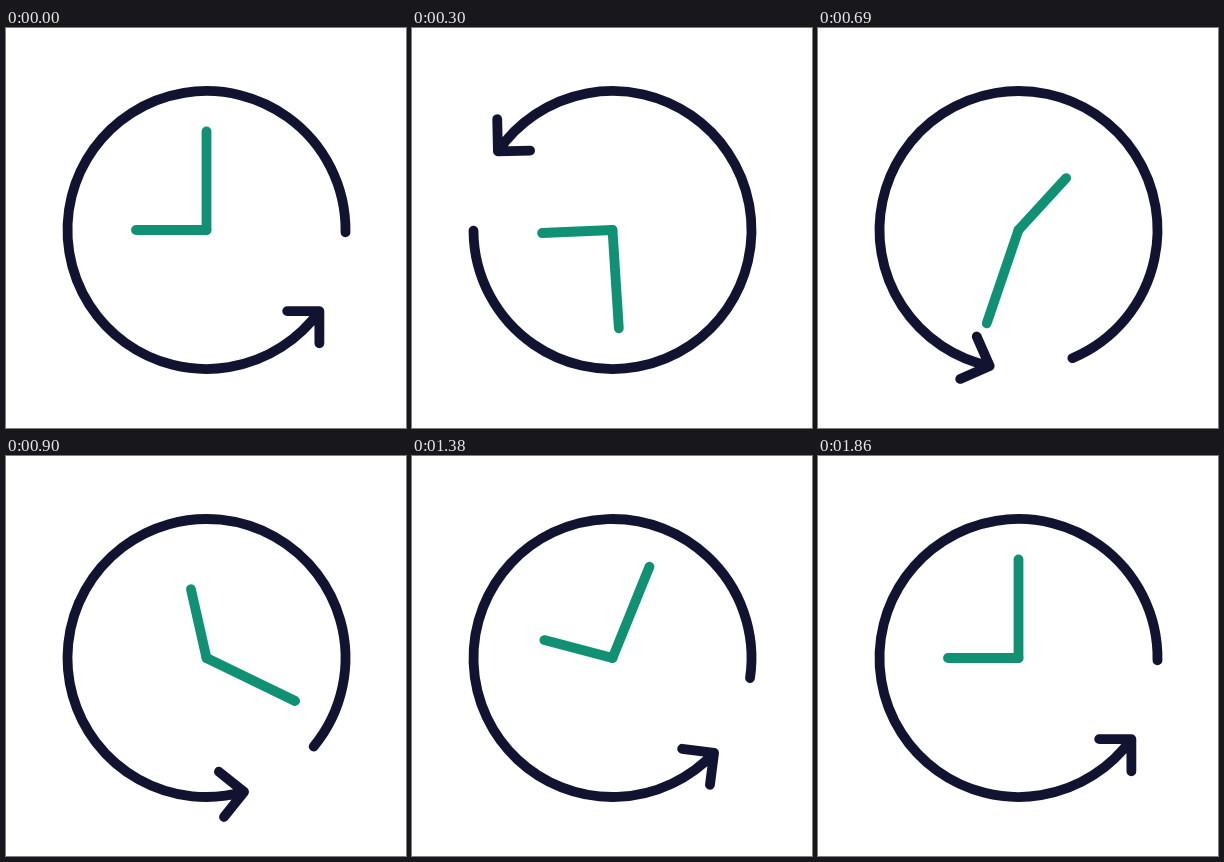
An HTML page with a canvas that plays this animation: 400x400 px, repeating every 1.89 s.

```html
<!DOCTYPE html>
<html lang="en">
<head>
<meta charset="utf-8">
<title>Rewinding clock</title>
<style>
  html, body { margin: 0; width: 100%; height: 100%; overflow: hidden; background: #fff; }
  canvas { display: block; width: 400px; height: 400px; }
</style>
</head>
<body>
<canvas id="stage"></canvas>
<script>
const LOOP = 1890, STEP = 30, SPIN = 1840;
const CX = 200.5, CY = 202, R = 139, LINE = 9.8;
const NAVY = "#121331", GREEN = "#109173";
const TAIL = 0.95, TIP = 35.7, BARB = 32.2;

const canvas = document.getElementById("stage");
const ctx = canvas.getContext("2d");
const dpr = window.devicePixelRatio || 1;
canvas.width = canvas.height = 400 * dpr;

const rad = deg => deg * Math.PI / 180;

const bezier = (a, b, u) =>
  3 * a * u * (1 - u) ** 2 + 3 * b * u * u * (1 - u) + u ** 3;

// Ease along cubic-bezier(.167, .167, 0, 1), solved by bisection.
function ease(x) {
  if (x <= 0) return 0;
  if (x >= 1) return 1;
  let lo = 0, hi = 1;
  for (let i = 0; i < 40; i++) {
    const mid = (lo + hi) / 2;
    if (bezier(0.167, 0, mid) < x) lo = mid; else hi = mid;
  }
  return bezier(0.167, 1, lo);
}

function rotated(deg, color, trace) {
  ctx.save();
  ctx.translate(CX, CY);
  ctx.rotate(rad(deg));
  ctx.strokeStyle = color;
  ctx.beginPath();
  trace();
  ctx.stroke();
  ctx.restore();
}

function arrow() {
  const x = R * Math.cos(rad(TIP)), y = R * Math.sin(rad(TIP));
  ctx.arc(0, 0, R, rad(TIP), rad(360 + TAIL));
  ctx.moveTo(x - BARB, y);
  ctx.lineTo(x, y);
  ctx.lineTo(x, y + BARB);
}

function hand(length) {
  ctx.moveTo(0, 0);
  ctx.lineTo(0, -length);
}

function draw(ms) {
  const turn = -360 * ease(ms / SPIN);
  ctx.setTransform(dpr, 0, 0, dpr, 0, 0);
  ctx.fillStyle = "#fff";
  ctx.fillRect(0, 0, 400, 400);
  ctx.lineWidth = LINE;
  ctx.lineCap = ctx.lineJoin = "round";
  rotated(turn, NAVY, arrow);
  rotated(270 + 2 * turn, GREEN, () => hand(70.5));
  rotated(3 * turn, GREEN, () => hand(98.5));
}

function tick() {
  const ms = performance.now() % LOOP;
  draw(Math.floor((ms + 0.5) / STEP) * STEP);
  requestAnimationFrame(tick);
}
tick();
</script>
</body>
</html>
```
